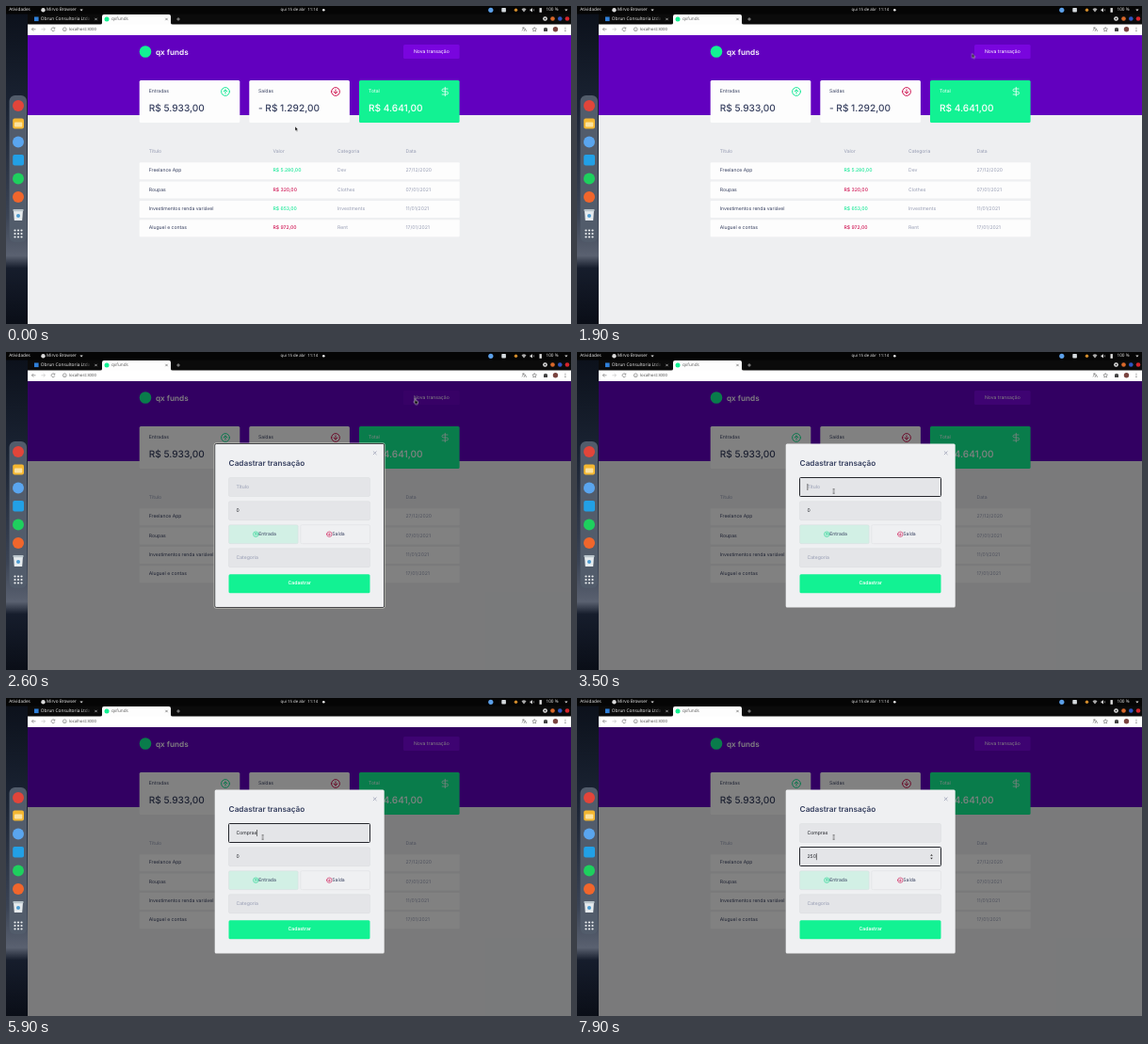
Animation of 600 by 338 pixels, one loop 8 s. Source, as an HTML page:

```html
<!DOCTYPE html>
<html lang="pt-BR">
<head>
<meta charset="utf-8">
<title>qx funds</title>
<style>
  html, body { margin: 0; width: 100%; height: 100%; overflow: hidden; background: #000; }
  svg { display: block; width: 600px; height: 338px; }
  text { font: 400 5.1px Inter, sans-serif; dominant-baseline: central; text-rendering: geometricPrecision; fill: #363f5f; white-space: pre; }
  .sys text { font: 500 4.7px "Open Sans", sans-serif; fill: #f2f2f2; }
  .mid { text-anchor: middle; }
  .white { fill: #fff; }
  .soft { fill: #969cb3; }
  .in { fill: #14e896; }
  .out { fill: #cf1050; }
  .cell { font-weight: 500; }
  .brand { font-size: 8.2px; font-weight: 600; fill: #fff; }
  .sum { font-size: 10.1px; font-weight: 500; }
  .head { font-size: 8.2px; font-weight: 600; }
  .line { fill: none; stroke-width: .95; stroke-linecap: round; stroke-linejoin: round; }
  .thin { fill: none; stroke-width: .6; }
  .field { fill: #e4e5e8; stroke: #d7d8db; stroke-width: .4; }
  .ring { fill: none; stroke: #24262c; stroke-width: 1; }
  .halo { fill: none; stroke: #f6f6e8; stroke-width: .5; }
  #title, #value { fill: #1c1e24; }

  .step { animation: 8s step-end infinite; }
  #pointer { animation-name: move; }
  #arrow { animation-name: arrow; }
  #hand { animation-name: hand; }
  #beam { animation-name: beam; }
  #btn { animation-name: hover; }
  #btnRing { animation-name: btnRing; }
  #modal { animation-name: modal; }
  #modalRing { animation-name: modalRing; }
  #titleRing { animation-name: titleRing; }
  #valueRing { animation-name: valueRing; }

  @keyframes move {
    0% { transform: translate(307px, 128px); }
    12.5% { transform: translate(308px, 127px); }
    18.75% { transform: translate(313px, 122px); }
    21.25% { transform: translate(342px, 99px); }
    22.5% { transform: translate(392px, 66px); }
    23.75% { transform: translate(419.5px, 50.5px); }
    25% { transform: translate(428px, 49.8px); }
    26.25% { transform: translate(432px, 49.6px); }
    27.5% { transform: translate(434px, 49.5px); }
    33.75% { transform: translate(427px, 55px); }
    35% { transform: translate(400px, 74px); }
    36.25% { transform: translate(355px, 106px); }
    37.5% { transform: translate(315px, 135px); }
    38.75% { transform: translate(288px, 144px); }
    40% { transform: translate(276px, 147.5px); }
    41.25%, 100% { transform: translate(272.6px, 148px); }
  }
  @keyframes arrow { 0%, 33.75% { visibility: visible; } 25%, 37.5%, 100% { visibility: hidden; } }
  @keyframes hand { 0%, 33.75%, 100% { visibility: hidden; } 25% { visibility: visible; } }
  @keyframes beam { 0% { visibility: hidden; } 37.5%, 100% { visibility: visible; } }
  @keyframes hover { 0%, 33.75%, 100% { fill: #7905de; } 26.25% { fill: #6c02c8; } }
  @keyframes btnRing { 0%, 32.5%, 100% { visibility: hidden; } 30% { visibility: visible; } }
  @keyframes modal { 0% { visibility: hidden; } 32.5%, 100% { visibility: visible; } }
  @keyframes modalRing { 0%, 43.75%, 100% { visibility: hidden; } 32.5% { visibility: visible; } }
  @keyframes titleRing { 0%, 80%, 100% { visibility: hidden; } 43.75% { visibility: visible; } }
  @keyframes valueRing { 0% { visibility: hidden; } 80%, 100% { visibility: visible; } }
</style>
</head>
<body>
<svg viewBox="0 0 600 338">
  <defs>
    <linearGradient id="sky" x2="0" y2="1">
      <stop offset="0" stop-color="#0c111b"/>
      <stop offset=".3" stop-color="#1a2333"/>
      <stop offset=".65" stop-color="#3a4354"/>
      <stop offset=".78" stop-color="#5a6170"/>
      <stop offset=".82" stop-color="#161d2c"/>
      <stop offset="1" stop-color="#0a0e17"/>
    </linearGradient>
    <linearGradient id="fade">
      <stop offset="0" stop-color="#0b0b0b" stop-opacity="0"/>
      <stop offset="1" stop-color="#0b0b0b"/>
    </linearGradient>
    <g id="up" class="line">
      <circle r="4.4"/>
      <path d="M0 2V-2M-1.9-.1 0-2 1.9-.1"/>
    </g>
    <path id="x" d="M-1.2-1.2 1.2 1.2M1.2-1.2-1.2 1.2" class="thin"/>
  </defs>

  <!-- desktop and dock -->
  <rect width="600" height="338" fill="#0b0b0b"/>
  <rect y="8" width="23" height="330" fill="url(#sky)"/>
  <rect x="3.500" y="95" width="18.500" height="156" rx="6" fill="#525c6b"/>
  <circle cx="13" cy="106" r="6" fill="#e2453a"/>
  <rect x="7.200" y="119.500" width="11.800" height="11" rx="2" fill="#f4b731"/>
  <rect x="9" y="123.500" width="8.200" height="5" rx="1" fill="#fbe2a0"/>
  <circle cx="13" cy="144.500" r="6" fill="#5aa5ee"/>
  <rect x="7.200" y="158" width="11.800" height="11.500" rx="2" fill="#22a0e6"/>
  <circle cx="13" cy="183.500" r="6" fill="#1ed05e"/>
  <circle cx="13" cy="203" r="6" fill="#f0662c"/>
  <path d="M8 217H18L17.200 228H8.800z" fill="#e6ebee"/>
  <rect x="7.500" y="216" width="11" height="2.200" rx=".6" fill="#b9c4ca"/>
  <circle cx="13" cy="223" r="2" fill="#4c9bd0"/>
  <g id="grid" fill="#eceff1"></g>

  <!-- system bar and browser frame -->
  <g class="sys">
    <rect width="600" height="8.500" fill="#050505"/>
    <text x="3.200" y="4.200">Atividades</text>
    <circle cx="39.500" cy="4.200" r="2.200" fill="#d9d9d9"/>
    <text x="43" y="4.200">Mirvo Browser</text>
    <path d="M78.500 3.400h3.200l-1.600 2z" fill="#ddd"/>
    <text x="291.500" y="4.200" style="font-size:4.300px">qui 15 de abr  11:14</text>
    <circle cx="337.300" cy="4.200" r="1.300" fill="#eee"/>
    <circle cx="514.800" cy="4.300" r="2.600" fill="#5b9fe8"/>
    <rect x="526.300" y="2" width="4.600" height="4.600" rx=".8" fill="#d5dade"/>
    <circle cx="541.500" cy="4.300" r="1.700" fill="#d58e2c"/>
    <path d="M547.500 3.400q2.500-2.200 5 0L550 6.500z" fill="#aaa"/>
    <path d="M556.500 3.400h1l1.500-1.300v4.400l-1.500-1.300h-1zM560.300 2.600q1.300 1.600 0 3.300" fill="#ddd"/>
    <path d="M566.500 2.100h2.400v4.700h-2.400z" fill="#ddd"/>
    <text x="573.500" y="4.200">100 %</text>
    <path d="M593.300 3.400h3.200l-1.600 2z" fill="#ddd"/>

    <rect x="30" y="11.500" width="4.600" height="4.600" fill="#2f7fd8"/>
    <text x="36.800" y="14" style="font-size:4.800px">Obrun Consultoria Ltda</text>
    <rect x="82" y="10" width="8" height="8" fill="url(#fade)"/>
    <rect x="90" y="10" width="10" height="8" fill="#0b0b0b"/>
    <use href="#x" x="95.500" y="14" stroke="#ddd"/>
    <path d="M100 20q2 0 2-2v-7q0-2 2-2h69q2 0 2 2v7q0 2 2 2z" fill="#fdfdfd"/>
    <circle cx="107" cy="14" r="2.500" fill="#12f293"/>
    <text x="112" y="14" style="fill:#555">qxfunds</text>
    <use href="#x" x="170.500" y="14" stroke="#555"/>
    <path d="M181.200 14h3.600M183 12.200v3.600" class="thin" stroke="#ddd"/>
    <circle cx="572.500" cy="13.500" r="2.300" fill="#f2f2f2"/>
    <circle cx="572.500" cy="13.500" r="1" fill="#222"/>
    <circle cx="580.500" cy="13.500" r="2.300" fill="#d9682a"/>
    <circle cx="588.300" cy="13.500" r="2.300" fill="#2c55c4"/>
    <circle cx="596" cy="13.500" r="2.300" fill="#d6242c"/>

    <rect x="23" y="19.500" width="577" height="11.500" fill="#fff"/>
    <g class="thin" stroke="#666">
      <path d="M31.500 24.800h-4M29.200 23l-1.800 1.800 1.800 1.800"/>
      <path d="M37.500 24.800h4M39.700 23l1.800 1.800-1.800 1.800" stroke="#bbb"/>
      <path d="M51.600 23.800a1.900 1.900 0 1 0 .2 1.600M51.800 22.600v1.400h-1.400"/>
      <circle cx="62.300" cy="24.800" r="1.900"/>
      <path d="M62.300 24.700v1M548 23.200h3M549.500 22.500q0 3-1.800 3.700M550 27l1.300-3 1.300 3"/>
      <path d="M561.200 22.500l.7 1.500 1.600.2-1.200 1.100.3 1.700-1.400-.8-1.400.8.3-1.700-1.200-1.100 1.600-.2z"/>
    </g>
    <path d="M571 23.500h1.200a.8.8 0 0 1 1.600 0H575v3.500h-4z" fill="#444"/>
    <circle cx="583.500" cy="24.800" r="2.700" fill="#7a4440"/>
    <path d="M593.500 22.700h.9v.9h-.9zM593.500 24.400h.9v.9h-.9zM593.500 26.100h.9v.9h-.9z" fill="#555"/>
    <text x="67" y="24.800" style="font-size:4.300px;fill:#444">localhost:3000</text>
  </g>

  <!-- page -->
  <rect x="23" y="31" width="577" height="307" fill="#eeeff1"/>
  <rect x="23" y="31" width="577" height="85" fill="#6200bf"/>
  <circle cx="148" cy="48.500" r="6.300" fill="#12f293"/>
  <text x="159" y="48.500" class="brand">qx funds</text>
  <rect id="btn" class="step" x="422" y="41" width="59.600" height="15" rx="1.500" fill="#7905de"/>
  <text x="451.800" y="48.600" class="mid white">Nova transação</text>
  <g id="btnRing" class="step">
    <rect x="421.500" y="40.500" width="60" height="16" rx="1" class="ring"/>
    <rect x="421.500" y="40.500" width="60" height="16" rx="1" class="halo" stroke-dasharray="1.200 1.200"/>
  </g>

  <g fill="#fdfdfd">
    <rect x="141.700" y="79" width="106.600" height="45" rx="1.500"/>
    <rect x="258.300" y="79" width="106.600" height="45" rx="1.500"/>
    <rect x="375" y="79" width="106.600" height="45" rx="1.500" fill="#12f293"/>
  </g>
  <text x="151.700" y="91">Entradas</text>
  <text x="151.700" y="108.500" class="sum">R$ 5.933,00</text>
  <use href="#up" x="233" y="91" stroke="#14e896"/>
  <text x="268" y="91">Saídas</text>
  <text x="268" y="108.500" class="sum">- R$ 1.292,00</text>
  <use href="#up" transform="translate(350 91) rotate(180)" stroke="#cf1050"/>
  <text x="385" y="91" class="white">Total</text>
  <text x="385" y="108.500" class="sum white">R$ 4.641,00</text>
  <path d="M466.300 86.300v9.400M469 88h-4a2 1.500 0 0 0 0 3h2.600a2 1.500 0 0 1 0 3h-4.400" class="line" stroke="#fff" style="stroke-width:.75"/>

  <text x="151.700" y="155" class="soft">Título</text>
  <text x="283.500" y="155" class="soft">Valor</text>
  <text x="352" y="155" class="soft">Categoria</text>
  <text x="424.500" y="155" class="soft">Data</text>
  <g id="rows"></g>

  <!-- dialog -->
  <g id="modal" class="step">
    <rect x="23" y="31" width="577" height="307" fill="#000" fill-opacity=".49"/>
    <rect x="221.700" y="97.500" width="180" height="174" rx="1.500" fill="#eff0f2"/>
    <use href="#x" transform="translate(391.700 107.300) scale(1.500)" stroke="#a4a9bb"/>
    <text x="236.600" y="118" class="head">Cadastrar transação</text>
    <rect x="236.500" y="133.500" width="150" height="20" rx="1.500" class="field"/>
    <rect x="236.500" y="158.700" width="150" height="20" rx="1.500" class="field"/>
    <rect x="236.500" y="183.700" width="73.700" height="20" rx="1.500" class="field" style="fill:#d2f0e5"/>
    <rect x="312.800" y="183.700" width="73.700" height="20" rx="1.500" class="field" style="fill:#eff0f2"/>
    <rect x="236.500" y="208.700" width="150" height="20" rx="1.500" class="field"/>
    <rect x="236.500" y="236.200" width="150" height="20" rx="1.500" fill="#12f293"/>
    <use href="#up" transform="translate(265.300 193.700) scale(.62)" stroke="#14d38a"/>
    <text x="268.300" y="193.800">Entrada</text>
    <use href="#up" transform="translate(343.300 193.700) rotate(180) scale(.62)" stroke="#cf1050"/>
    <text x="346.300" y="193.800">Saída</text>
    <text x="244.500" y="218.800" class="soft">Categoria</text>
    <text x="311.700" y="246.300" class="mid white" style="font-weight:600">Cadastrar</text>
    <text x="244.500" y="143.600" id="hint" class="soft">Título</text>
    <rect id="mark" x="244.300" y="165.500" width="3.500" height="6.500" fill="#3a78d8"/>
    <text x="244.500" y="143.600" id="title"></text>
    <text x="244.500" y="168.800" id="value">0</text>
    <rect id="caret" width=".6" height="7" fill="#222"/>
  </g>
  <g id="modalRing" class="step">
    <rect x="221.700" y="97.500" width="180" height="174" rx="1.500" class="ring"/>
    <rect x="221" y="96.800" width="181.400" height="175.400" rx="2" class="halo"/>
  </g>
  <rect id="titleRing" class="step ring" x="236.500" y="133.500" width="150" height="20" rx="1"/>
  <g id="valueRing" class="step">
    <rect x="236.500" y="158.500" width="150" height="20" rx="1" class="ring"/>
    <path d="M375.200 167.800l1.300-1.700 1.300 1.700zM375.200 169.800l1.300 1.700 1.300-1.700z" fill="#333"/>
  </g>

  <g id="pointer" class="step">
    <path id="arrow" class="step" d="M0 0V4.800L1.100 3.800 1.900 5.500 2.700 5.100 1.900 3.500H3.400z" fill="#111" stroke="#fff" stroke-width=".4"/>
    <path id="hand" class="step" d="M0 0q.9-.6 1 .5V2.200l2 .5q.7.200.6 1L3.200 5.800H.6L-1.100 3.500q.2-.7 1.100 0z" fill="#111" stroke="#fff" stroke-width=".5"/>
    <path id="beam" class="step thin" d="M-.9-2.300H.9M0-2.300V2.300M-.9 2.300H.9" stroke="#333"/>
  </g>
</svg>
<script>
  const $ = id => document.getElementById(id);

  const rows = [
    ['Freelance App', 'R$ 5.280,00', 'Dev', '27/12/2020', 'in'],
    ['Roupas', 'R$ 320,00', 'Clothes', '07/01/2021', 'out'],
    ['Investimentos renda variável', 'R$ 653,00', 'Investments', '11/01/2021', 'in'],
    ['Aluguel e contas', 'R$ 972,00', 'Rent', '17/01/2021', 'out']
  ];
  $('rows').innerHTML = rows.map(([name, amount, kind, date, tone], i) => `
    <g transform="translate(0 ${175.2 + i * 20.35})">
      <rect x="141.700" y="-9" width="340" height="18" rx="1" fill="#fdfdfd"/>
      <text x="151.700">${name}</text>
      <text x="283.500" class="cell ${tone}">${amount}</text>
      <text x="352" class="soft">${kind}</text>
      <text x="424.500" class="soft">${date}</text>
    </g>`).join('');

  $('grid').innerHTML = Array.from({ length: 9 }, (_, i) =>
    `<circle cx="${9.5 + i % 3 * 3.5}" cy="${238.5 + (i / 3 | 0) * 3.5}" r="1.1"/>`).join('');

  const LOOP = 8000;
  const titleKeys = [4900, 5100, 5300, 5600, 5700, 5800, 5900];
  const valueKeys = [7200, 7400, 7900];
  const typed = (word, keys, t) => word.slice(0, keys.filter(k => t >= k).length);
  const show = (el, on) => el.setAttribute('opacity', on ? 1 : 0);

  let start;
  function draw(now) {
    start ??= now;
    const t = (now - start) % LOOP;
    const title = typed('Compras', titleKeys, t);
    const value = typed('250', valueKeys, t);
    const selected = t >= 6400 && !value;
    $('title').textContent = title;
    $('value').textContent = value || '0';
    $('value').style.fill = selected ? '#fff' : '';
    show($('hint'), !title);
    show($('mark'), selected);

    const active = value ? $('value') : $('title');
    const blinkOff = t >= 4100 && t < 4700;
    $('caret').setAttribute('x', 244.6 + active.getComputedTextLength());
    $('caret').setAttribute('y', value ? 165.2 : 140);
    show($('caret'), t >= 3500 && !blinkOff && !selected);
    requestAnimationFrame(draw);
  }
  requestAnimationFrame(draw);
</script>
</body>
</html>
```
